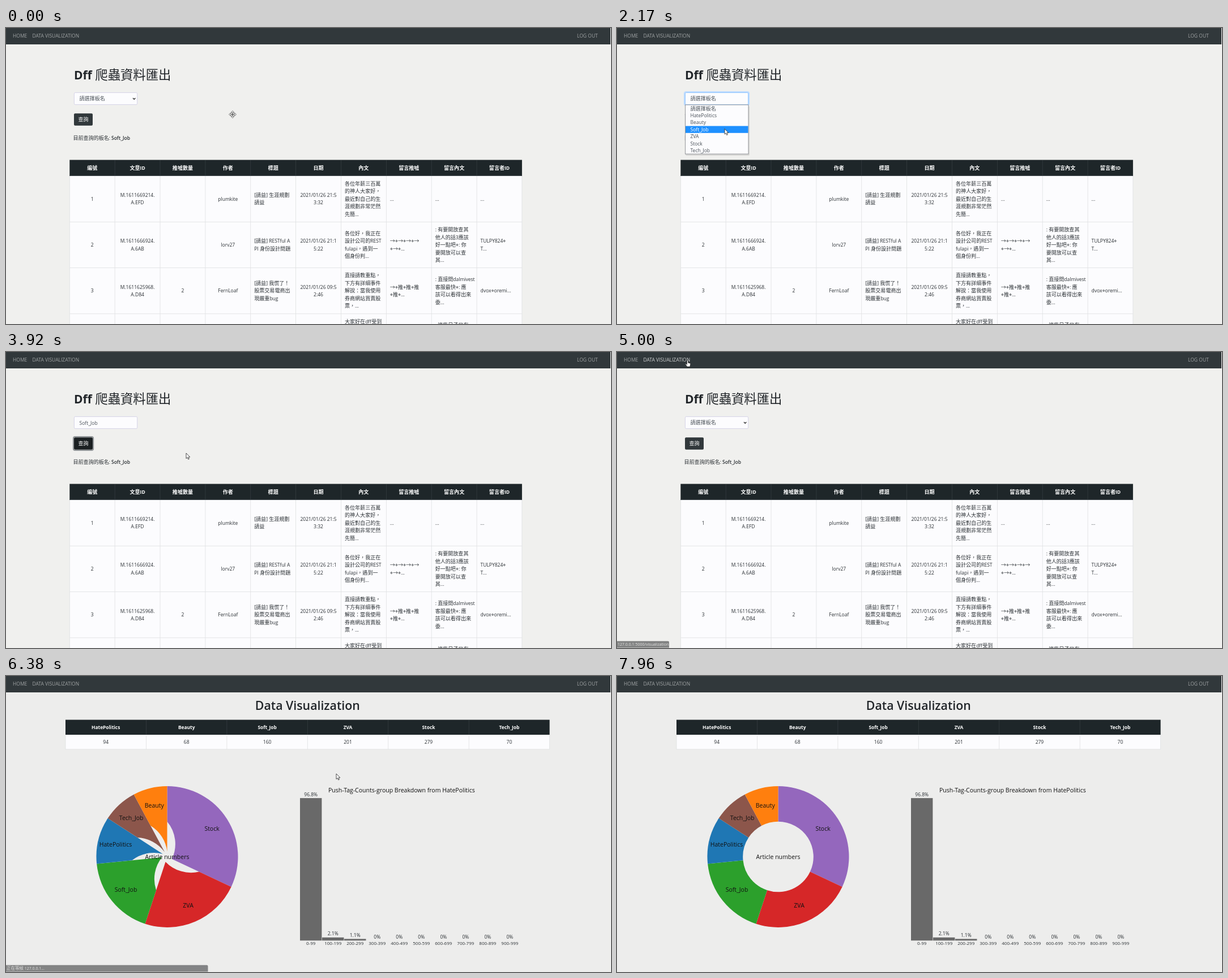
Write an HTML page that moves like this. It is 1068 by 524 pixels and loops after 8000 ms.

```html
<!DOCTYPE html>
<html lang="zh-Hant">
<head>
<meta charset="utf-8">
<title>Data Visualization</title>
<style>
html, body { margin: 0; width: 100%; height: 100%; overflow: hidden; background: #eff0ee; }
svg { display: block; width: 100vw; height: 100vh; }
text { font-family: "Open Sans", "Noto Sans", "Noto Sans CJK TC", "Noto Sans CJK JP", "Noto Sans CJK", "DejaVu Sans", sans-serif; white-space: pre; }
</style>
</head>
<body>
<svg id="stage" viewBox="0 0 1068 524"></svg>
<script>
const LOOP = 8000;
const INK = '#2b3034', DARK = '#1e2629', NAV = '#31383b', LINE = '#dfe0e2', PAPER = '#fcfcfe';
const CJK = /[\u2190-\u2bff\u2e80-\uffef]+/g;

const rect = (x, y, w, h, fill, extra = '') =>
  `<rect x="${x}" y="${y}" width="${w}" height="${h}" fill="${fill}" ${extra}/>`;

// y is the visual middle of the line; CJK runs are set slightly larger than Latin ones
function text(x, y, str, { size = 8.5, fill = INK, weight = 400, anchor = 'start', id = '' } = {}) {
  const body = str.replace(CJK, run => `<tspan font-size="${(size * 1.065).toFixed(2)}"${size > 15 ? ' font-weight="500"' : ''}>${run}</tspan>`);
  return `<text ${id && `id="${id}"`} x="${x}" y="${y + size * .36}" font-size="${size}" fill="${fill}" font-weight="${weight}" text-anchor="${anchor}">${body}</text>`;
}
const middle = (x, y, str, opts) => text(x, y, str, { anchor: 'middle', ...opts });
const group = (id, body, extra = '') => `<g id="${id}" ${extra}>${body}</g>`;

// Board page
const boards = ['HatePolitics', 'Beauty', 'Soft_Job', 'ZVA', 'Stock', 'Tech_Job'];
const prompt = '請選擇板名';
const heads = ['編號', '文章ID', '推噓數量', '作者', '標題', '日期', '內文', '留言推噓', '留言內文', '留言者ID'];
const rows = [
  ['1', 'M.1611669214.|A.EFD', '', 'plumkite', '[請益] 生涯規劃|請益', '2021/01/26 21:5|3:32',
    '各位年薪三百萬|的神人大家好，|最近對自己的生|涯規劃非常茫然|先簡...', '...', '...', '...'],
  ['2', 'M.1611666924.|A.6AB', '', 'lorv27', '[請益] RESTful A|PI 身份設計問題', '2021/01/26 21:1|5:22',
    '各位好，我正在|設計公司的REST|fulapi，遇到一|個身份判...', '→⌖→⌖→⌖→|⌖→⌖...',
    ': 有要開放查其|他人的話3應該|好一點吧⌖: 你|要開放可以查|其...', 'TULPY824⌖|T...'],
  ['3', 'M.1611625968.|A.D84', '2', 'FernLoaf', '[請益] 我慌了！|股票交易電商出|現嚴重bug', '2021/01/26 09:5|2:46',
    '直接請教重點，|下方有詳細事件|解說：當我使用|券商網站買賣股|票，...', '→⌖推⌖推⌖推|⌖推⌖...',
    ': 直接問dalmivest|客服最快⌖: 應|該可以看得出來|委...', 'dvox⌖oremi...'],
  ['', '', '', '', '', '', '大家好在dff受到||||', '', ': 這些日子只有|||', '']
];

function articleTable() {
  const left = 112.3, top = 262, colW = 79.86, rowH = 81.3;
  let s = rect(left, top, colW * 10, 262, PAPER) + rect(left, 233.5, colW * 10, 28.5, DARK);
  heads.forEach((h, i) => {
    const x = left + i * colW;
    s += middle(x + colW / 2, 247.5, h, { fill: '#fff', weight: 700 });
    if (i) s += rect(x - .4, 234, .8, 28, '#343c40');
    s += rect(x - .4, top, .8, 262, LINE);
  });
  s += rect(left + colW * 10 - .4, top, .8, 262, LINE) + rect(left, 260.8, colW * 10, 1.2, '#3a4246');
  rows.forEach((row, r) => {
    const mid = top + (r + .5) * rowH;
    if (r) s += rect(left, top + r * rowH - .4, colW * 10, .8, LINE);
    row.forEach((cell, c) => {
      const lines = cell.split('|'), centred = c < 4 || c === 5;
      lines.forEach((line, i) => {
        if (!line) return;
        const x = left + c * colW + (centred ? colW / 2 : 6.5);
        s += text(x, mid + (i - (lines.length - 1) / 2) * 13.5, line, { anchor: centred ? 'middle' : 'start' });
      });
    });
  });
  return s;
}

function dropdown() {
  const stepY = 12.35;
  let s = rect(121, 138, 113, 88, '#000', 'opacity=".1" rx="2"') +
    rect(120.5, 136, 111.5, 87, PAPER, 'stroke="#8a8c90" stroke-width=".9"') +
    rect(121, 173.5, 110.5, 12.3, '#1e90ff', 'id="pick"');
  [prompt, ...boards].forEach((b, i) => s += text(129.5, 142.7 + i * stepY, b, { fill: i === 3 ? '#fff' : '#495057' }));
  return s;
}

const boardPage = () => group('board',
  text(120, 83.5, 'Dff 爬蟲資料匯出', { size: 21, weight: 700, fill: '#212529' }) +
  rect(119, 113, 114, 24, 'none', 'id="selectGlow" rx="3" stroke="#bfdcff" stroke-width="2.2"') +
  rect(120.4, 114.4, 111.3, 21.2, PAPER, 'id="select" rx="2" stroke="#d2d0e6" stroke-width=".9"') +
  text(129.5, 125.3, prompt, { fill: '#495057', id: 'prompt' }) +
  text(129.5, 125.8, 'Soft_Job', { fill: '#495057', id: 'chosen' }) +
  '<path id="chevron" d="M224 124l2.2 2.3 2.2-2.3" fill="none" stroke="#333" stroke-width="1.3"/>' +
  rect(118.9, 150, 35.2, 24, 'none', 'id="buttonGlow" rx="3" stroke="#8f9396" stroke-width="2"') +
  rect(120, 151.3, 33, 21.5, NAV, 'id="button" rx="2"') +
  middle(136.5, 162, '查詢', { fill: '#fff' }) +
  text(118.5, 195.3, '目前查詢的板名: ') + text(186, 195.3, 'Soft_Job', { weight: 600 }) +
  articleTable() + group('list', dropdown()));

// Visualization page
const counts = [94, 68, 160, 201, 279, 70];

function summary(id, left, width) {
  const w = width / 6;
  let s = middle(left + width / 2, 52, 'Data Visualization', { size: 21.3, weight: 600, fill: '#212529' }) +
    rect(left, 77.5, width, 26.5, DARK) + rect(left, 104, width, 26, PAPER) + rect(left, 129.3, width, .8, LINE);
  boards.forEach((b, i) => {
    const x = left + i * w;
    s += middle(x + w / 2, 91, b, { fill: '#fff', weight: 700, size: 8.4 }) + middle(x + w / 2, 117.3, String(counts[i]));
    if (i) s += rect(x - .4, 78, .8, 26, '#353d41');
    s += rect(x - .4, 104, .8, 26, LINE);
  });
  return group(id, s + rect(left + width - .4, 104, .8, 26, LINE));
}

const R = 125, HOLE = 62.3;
const hues = ['#1f77b4', '#ff7f0e', '#2ca02c', '#d62728', '#9467bd', '#8c564b'];
const total = counts.reduce((a, b) => a + b);
let turn = 0;
const slices = boards.map((name, i) => ({ name, n: counts[i], hue: hues[i] }))
  .sort((a, b) => b.n - a.n)
  .map(s => ({ ...s, from: turn, to: turn += s.n / total * 2 * Math.PI }));
const polar = (r, a) => [r * Math.sin(a), -r * Math.cos(a)];

function slicePath({ from, to }, k) {
  const edge = `M${polar(R, from)}A${R} ${R} 0 0 1 ${polar(R, to)}`;
  return k <= 0 ? edge + 'L0 0Z'
    : `${edge}L${polar(HOLE * k, to)}A${HOLE} ${HOLE} 0 0 0 ${polar(HOLE, from)}Z`;
}

function charts() {
  let s = '<g transform="translate(284.5 320)">';
  slices.forEach(p => s += `<path class="slice" fill="${p.hue}"/>`);
  slices.forEach(p => {
    const [x, y] = polar((R + HOLE) / 2, (p.from + p.to) / 2);
    s += middle(x, y, p.name, { size: 10.5, fill: '#111' });
  });
  s += middle(0, .5, 'Article numbers', { size: 10.5, fill: '#111' }) + '</g>';
  s += text(569, 202.5, 'Push-Tag-Counts-group Breakdown from HatePolitics', { size: 10.5, fill: '#111' });
  [96.8, 2.1, 1.1, 0, 0, 0, 0, 0, 0, 0].forEach((v, i) => {
    const x = 538.2 + i * 39.02, h = v * 2.605;
    s += rect(x - 19.2, 468.3 - h, 38.4, h, '#696969') +
      middle(x, 461.8 - h, v + '%') +
      middle(x, 473, `${i * 100}-${i * 100 + 99}`, { size: 8 });
  });
  return group('charts', s);
}

const status = (id, w, label) => group(id,
  `<path d="M0 511.8H${w - 2}q2 0 2 2V523.5H0Z" fill="#191b1c"/>` + text(1, 517.8, label, { size: 7, fill: '#d8d8d8' }));

const pointers =
  group('arrow', '<path d="M0 0V9.6L2.2 7.6 3.7 11 5.3 10.3 3.9 7H6.8Z" fill="#fff" stroke="#222" stroke-width=".8" stroke-linejoin="round"/>') +
  group('hand', '<path d="M-1 0Q0-1.2 1 0V4L4.7 5Q5.4 5.3 5.2 6.5L4.3 11H-.8L-3.6 6.8Q-3.4 5.4-2.3 6L-1 7.2Z" fill="#fff" stroke="#222" stroke-width=".7"/>') +
  group('pan', '<circle r="1.2" fill="#444"/>' + [0, 90, 180, 270].map(a =>
    `<path transform="rotate(${a})" d="M0-6.4L2.6-3.6H.9V-2H-.9V-3.6H-2.6Z" fill="#fff" stroke="#333" stroke-width=".7"/>`).join(''));

const stage = document.getElementById('stage');
stage.innerHTML = rect(0, 0, 1068, 524, '#f0f0ee', 'id="back"') + rect(0, 0, 1068, 29, NAV) +
  text(12, 14, 'HOME', { fill: '#a0a4a5' }) + text(46.5, 14, 'DATA VISUALIZATION', { fill: '#a0a4a5', id: 'link' }) +
  text(1008, 14, 'LOG OUT', { fill: '#a0a4a5', id: 'logout' }) +
  rect(1067, 0, 1, 524, '#f4f4f4', 'id="gutter"') +
  boardPage() + summary('wide', 106.2, 862.4) + summary('narrow', 105, 854.6) + charts() +
  status('hint', 92, '127.0.0.1:5000/visualization') + status('wait', 356.5, '正在等候 127.0.0.1...') +
  group('pointer', pointers);

const ui = {};
stage.querySelectorAll('[id]').forEach(el => ui[el.id] = el);
const slicePaths = stage.querySelectorAll('.slice');

// Pointer stops: time, x, y
const track = [
  [170, 400, 153], [880, 325, 108], [1000, 325, 108], [1170, 270, 73], [1330, 270, 73], [1500, 165, 125],
  [1790, 165, 125], [2130, 190, 178.5], [2790, 190, 178.5], [3300, 138, 163], [3710, 138, 163],
  [3900, 318, 179], [4460, 318, 179], [4960, 124.5, 15], [5290, 124.5, 15], [5690, 476, 160],
  [6040, 500, 163], [6380, 583, 173], [6920, 680, 190], [6960, 680, 190], [7250, 400, 300],
  [7500, 165, 330], [7750, 250, 340], [7960, 300, 345]
];
const show = (id, on) => ui[id].style.display = on ? '' : 'none';
const paint = (id, name, value) => ui[id].setAttribute(name, value);
const clamp = v => Math.max(0, Math.min(1, v));
const cubic = u => u < .5 ? 4 * u ** 3 : 1 - 4 * (1 - u) ** 3;

function pointerAt(t) {
  const next = track.findIndex(p => p[0] > t);
  if (next === 0) return track[0].slice(1);
  if (next < 0) return track[track.length - 1].slice(1);
  const [t0, x0, y0] = track[next - 1], [t1, x1, y1] = track[next];
  const u = (t - t0) / (t1 - t0), k = u * u * (3 - 2 * u);
  return [x0 + (x1 - x0) * k, y0 + (y1 - y0) * k];
}

function draw(t) {
  const onBoard = t < 5290, loaded = t >= 6040;
  const open = t >= 1790 && t < 2790, chosen = t >= 2790 && t < 4040;
  const focus = t >= 1790 && t < 3500, pressed = t >= 3500 && t < 4040;
  const hover = t >= 4900 && onBoard;

  paint('back', 'fill', onBoard ? '#f0f0ee' : '#ededec');
  show('board', onBoard);
  show('wide', !onBoard && !loaded);
  show('narrow', loaded);
  show('charts', loaded);
  show('gutter', onBoard || loaded);
  paint('logout', 'x', onBoard || loaded ? 1008 : 1018);
  paint('link', 'fill', hover ? '#d0d2d3' : '#a0a4a5');

  show('list', open);
  show('selectGlow', focus);
  paint('select', 'stroke', focus ? '#80bdff' : '#d2d0e6');
  show('prompt', !chosen);
  show('chosen', chosen);
  show('chevron', !open && !chosen);
  show('buttonGlow', pressed);
  paint('button', 'fill', pressed ? '#1b2022' : NAV);

  paint('hint', 'opacity', t < 5210 ? clamp((t - 4920) / 160) : 0);
  paint('wait', 'opacity', t < 5210 ? 0 : clamp((6560 - t) / 360));

  const k = cubic(clamp((t - 6130) / 750));
  slices.forEach((s, i) => slicePaths[i].setAttribute('d', slicePath(s, k)));

  show('pan', t < 170);
  show('hand', hover);
  show('arrow', t >= 170 && !hover && t < 7950);
  paint('pointer', 'transform', `translate(${pointerAt(t)})`);
}

function frame() {
  draw(performance.now() % LOOP);
  requestAnimationFrame(frame);
}
frame();
</script>
</body>
</html>
```
